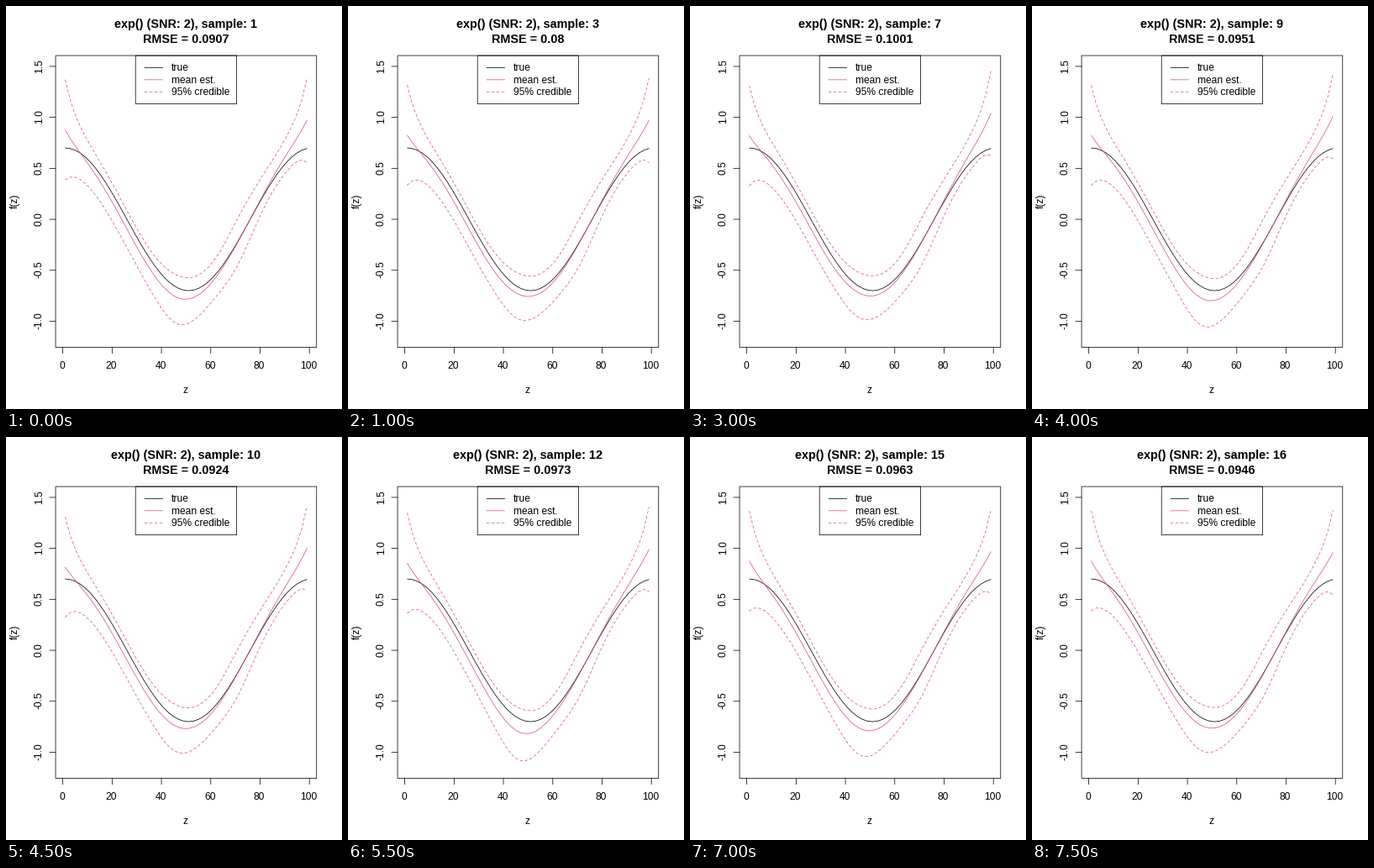
Animation, 400 px wide and 480 px high, one loop 8 s. Source, as a matplotlib script:

```python
import numpy as np
import matplotlib.pyplot as plt
from matplotlib.animation import FuncAnimation

W, H, DPI = 400, 480, 100
PT = 72 / DPI                      # points per pixel
LW = .75 * PT
PINK = "#DF536B"
LEFT, RIGHT, TOP, BOTTOM = 59.04, 369.76, 59.04, 406.56
X0, X1, Y0, Y1 = -2.92, 102.92, -1.256, 1.606

plt.rcParams["font.family"] = "Liberation Sans"

# Key samples: estimate at both ends, extra depth of the trough, error
KEYS = [1, 3, 5, 7, 8, 10, 13, 16]
START = [.877, .825, .905, .82, .83, .815, .875, .877]
END = [.97, .97, 1.03, 1.04, 1.02, 1.0, .985, .96]
DEPTH = [.017, -.012, .005, -.017, .065, 0, .078, -.005]
RMSE = [.0907, .08, .1138, .1001, .0979, .0924, .0998, .0946]

z = np.linspace(1, 99, 50)
truth = .7 * np.cos(2 * np.pi * (z - 1) / 100)


def px(v):
    return LEFT + (np.asarray(v) - X0) / (X1 - X0) * (RIGHT - LEFT)


def py(v):
    return BOTTOM - (np.asarray(v) - Y0) / (Y1 - Y0) * (BOTTOM - TOP)


def bump(center, width):
    return np.exp(-((z - center) / width) ** 2)


def rise(width_left, width_right):
    """Exponential growth towards the left and the right end."""
    return np.exp((1 - z) / width_left), np.exp((z - 99) / width_right)


def curves(n):
    start, end, depth = (np.interp(n, KEYS, v) for v in (START, END, DEPTH))
    bias = .1 / (1 + np.exp((z - 56) / 7))
    left, right = rise(6, 6.5)
    mean = (truth - bias + (start - truth[0] + .1) * left
            + (end - truth[-1]) * right - depth * bump(47, 12))

    left, right = rise(4.5, 3)
    half = (.18 + .31 * left + .235 * right + (.05 + .5 * depth) * bump(46, 9)
            + .05 * bump(71, 7) - .03 * bump(87, 7))
    center = mean - .02 * bump(46, 9) + .025 * bump(80, 8)
    return mean, center - half, center + half


fig = plt.figure(figsize=(W / DPI, H / DPI), dpi=DPI, facecolor="white")
ax = fig.add_axes([0, 0, 1, 1])
ax.set(xlim=(0, W), ylim=(H, 0))
ax.axis("off")


def line(x, y, color="black", dashed=False):
    art, = ax.plot(x, y, color=color, lw=LW, snap=False,
                   solid_capstyle="round", solid_joinstyle="round",
                   dash_capstyle="round", dash_joinstyle="round")
    if dashed:
        art.set_dashes((4, 4))
    return art


def text(x, y, s, size=12, ha="center", **kw):
    return ax.text(x, y, s, fontsize=size * PT, ha=ha, va="baseline",
                   rotation_mode="anchor", **kw)


def box(x0, y0, x1, y1):
    ax.add_patch(plt.Rectangle((x0, y0), x1 - x0, y1 - y0, fill=False,
                               lw=LW, ec="black", snap=False))


line(px(z), py(truth))
mean = line([], [], PINK)
low = line([], [], PINK, True)
high = line([], [], PINK, True)

box(LEFT, TOP, RIGHT, BOTTOM)
for v in range(0, 101, 20):
    line([px(v)] * 2, [BOTTOM, BOTTOM + 7.2])
    text(px(v) - .8, 432, str(v))
for v in np.arange(-1, 1.6, .5):
    line([LEFT - 7.2, LEFT], [py(v)] * 2)
    text(42.8, py(v) - .8, f"{v:.1f}", rotation=90)
text(213.6, 461, "z")
text(13.8, 232, "f(z)", rotation=90)

box(154.2, TOP, 274.6, TOP + 57.6)
legend = [("true", "black", False), ("mean est.", PINK, False),
          ("95% credible", PINK, True)]
for i, (label, color, dashed) in enumerate(legend):
    y = TOP + 14.4 * (i + 1)
    line([165, 186.6], [y, y], color, dashed)
    text(197, y + 3.8, label, ha="left")

title = text(214.4, 26, "", 14.4, weight="bold")
subtitle = text(214.4, 44, "", 14.4, weight="bold")


def update(frame):
    n = frame + 1
    for art, values in zip((mean, low, high), curves(n)):
        art.set_data(px(z), py(values))
    rmse = float(np.interp(n, KEYS, RMSE))
    title.set_text(f"exp() (SNR: 2), sample: {n}")
    subtitle.set_text(f"RMSE = {round(rmse, 4):g}")
    return mean, low, high, title, subtitle


anim = FuncAnimation(fig, update, frames=16, interval=500, repeat=True,
                     repeat_delay=0, blit=False)
plt.show()
```
